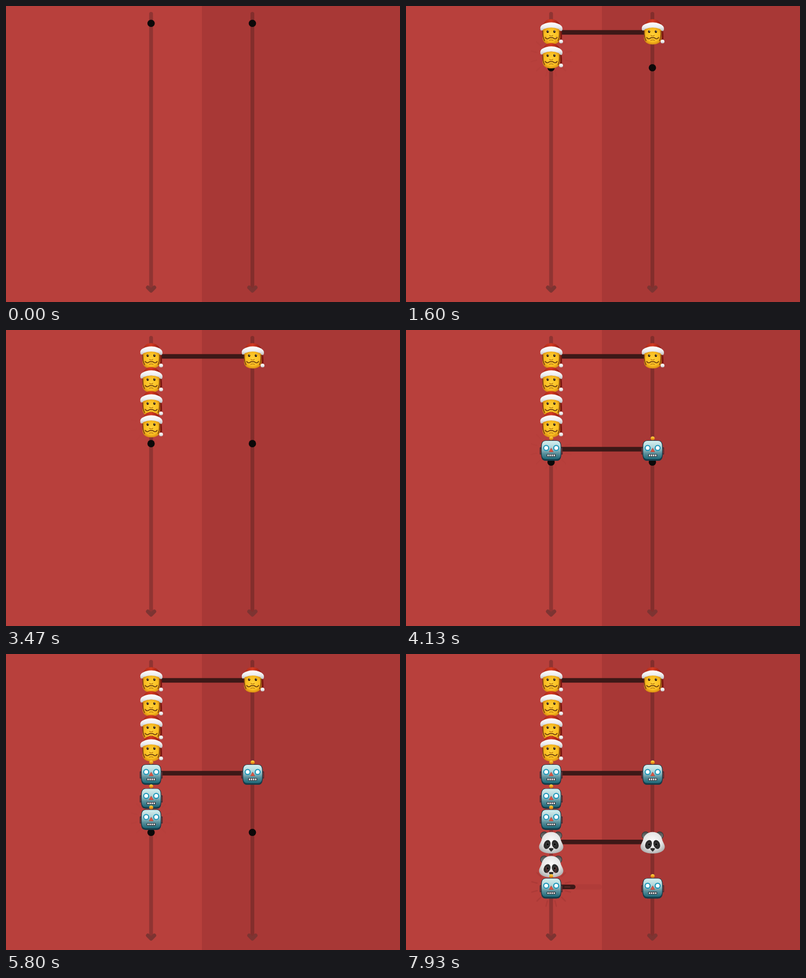
An HTML page that plays this animation: 730 by 550 pixels, repeating every 8 s.

```html
<!DOCTYPE html>
<html lang="en">
<head>
<meta charset="utf-8">
<title>Event timelines</title>
<style>
  html, body { margin: 0; width: 100%; height: 100%; overflow: hidden; background: #b8403c; }
  svg { display: block; width: 100vw; height: 100vh; }
</style>
</head>
<body>
<svg viewBox="0 0 730 550">
  <defs>
    <radialGradient id="skin" cx=".5" cy=".45" r=".62">
      <stop offset="0" stop-color="#ffd23a"/><stop offset=".62" stop-color="#f9bd20"/><stop offset="1" stop-color="#cf7d0d"/>
    </radialGradient>
    <linearGradient id="cap" x2="1">
      <stop offset="0" stop-color="#a92a1a"/><stop offset=".45" stop-color="#d43a22"/><stop offset="1" stop-color="#8a1810"/>
    </linearGradient>
    <linearGradient id="fur" x2="0" y2="1">
      <stop offset="0" stop-color="#fff"/><stop offset=".55" stop-color="#ececee"/><stop offset="1" stop-color="#bdbdc0"/>
    </linearGradient>
    <linearGradient id="metal" x2="0" y2="1">
      <stop offset="0" stop-color="#d3f0f0"/><stop offset=".35" stop-color="#b2d5d9"/><stop offset=".7" stop-color="#578e9a"/><stop offset="1" stop-color="#1d6878"/>
    </linearGradient>
    <linearGradient id="bulb" x2="0" y2="1">
      <stop offset="0" stop-color="#ffd84a"/><stop offset=".5" stop-color="#f3a51d"/><stop offset="1" stop-color="#b95c12"/>
    </linearGradient>
    <radialGradient id="coat" cx=".5" cy=".4" r=".62">
      <stop offset="0" stop-color="#fafafa"/><stop offset=".6" stop-color="#e6e6e6"/><stop offset="1" stop-color="#b0b0b0"/>
    </radialGradient>
    <linearGradient id="ear" x2="0" y2="1">
      <stop offset="0" stop-color="#4d4d4d"/><stop offset="1" stop-color="#848484"/>
    </linearGradient>

    <g id="santa">
      <path d="M13-19Q21-9 20 14L16 13Z" fill="#7c1712"/>
      <path d="M-16-9V9C-16 18-10 22.500 0 22.500S16.500 18 16.500 9V-9Z" fill="url(#skin)"/>
      <path d="M-15.500-3Q-16 9-12 16M15.500-3Q16 9 12.500 16" fill="none" stroke="#7d4312" stroke-width="1.700"/>
      <path d="M-15-12Q-13-24.500 0-24.500Q13-24.500 18-10Z" fill="url(#cap)"/>
      <path d="M-19.500-4Q-21.500-9-18-13Q-9-19 1-18.500Q13-18 19-12Q22.500-8 20-3Q17-1 14-6Q0-12-14-6Q-17-2-19.500-4Z" fill="url(#fur)"/>
      <circle cx="18.300" cy="17" r="3.600" fill="url(#fur)"/>
      <g fill="#26160b"><ellipse cx="-6.500" cy="-1.500" rx="2.100" ry="2.500"/><ellipse cx="6" cy="-1.500" rx="2.100" ry="2.500"/></g>
      <g fill="#fff"><circle cx="-6" cy="-2.500" r=".8"/><circle cx="6.500" cy="-2.500" r=".8"/></g>
      <path d="M-3 5.500Q-1.500 7.500 0 6.500Q1.500 7.500 3 5.500" fill="none" stroke="#c47f0e" stroke-width="1.500" stroke-linecap="round"/>
      <path d="M-11 9.500Q-9 13-5.500 11.500Q-2 9 0 10Q2 9 5.500 11.500Q9 13 11 9.500" fill="none" stroke="#71400f" stroke-width="1.700" stroke-linecap="round"/>
      <path d="M-4 15Q0 13 4 15" fill="none" stroke="#a8650f" stroke-width="1.100"/>
    </g>

    <g id="robot">
      <path d="M-4.500-15Q-4-18.500 0-18.500T4.500-15Z" fill="#594168"/>
      <circle cy="-20" r="3.700" fill="url(#bulb)"/>
      <path d="M-18-2.500H-20.500V9H-18ZM18-2.500H20.500V9H18Z" fill="#a8342e" stroke="#3f2a33" stroke-width="1.300"/>
      <path id="shell" d="M-10-16H10Q17.500-16 18.300-8Q19 3 18.300 13Q17.500 21.500 10 21.500H-10Q-17.500 21.500-18.300 13Q-19 3-18.300-8Q-17.500-16-10-16Z" fill="#173c49"/>
      <use href="#shell"/>
      <path d="M-10-15.500H10Q16.500-15.500 17.300-8Q18 2 17.300 11Q16.500 18.500 10 18.500H-10Q-16.500 18.500-17.300 11Q-18 2-17.300-8Q-16.500-15.500-10-15.500Z" fill="url(#metal)"/>
      <g fill="#fff" stroke="#1795b9" stroke-width="2"><circle cx="-9.300" cy="-2.300" r="4.600"/><circle cx="9.300" cy="-2.300" r="4.600"/></g>
      <path d="M0-2L3.800 5H-3.800Z" fill="#dd5440" stroke="#a83c34" stroke-width=".6"/>
      <rect x="-8.300" y="9" width="16.600" height="5" rx="1" fill="#33383f"/>
      <path d="M-7 11.500H7.200" stroke="#f4f4f4" stroke-width="2.800" stroke-dasharray="2.500 1.300"/>
    </g>

    <g id="panda">
      <g fill="url(#ear)" stroke="#3a3a3a" stroke-width="1.200"><circle cx="-13" cy="-12" r="6.800"/><circle cx="13" cy="-12" r="6.800"/></g>
      <path d="M0-18.500C10-18.500 16.500-12 18-3C20 2 22.500 5 22.500 9.500C22 17.500 12 21.500 0 21.500S-22 17.500-22.500 9.500C-22.500 5-20 2-18-3C-16.500-12-10-18.500 0-18.500Z" fill="url(#coat)"/>
      <g fill="#2b2b2b"><ellipse rx="5.900" ry="8.500" transform="translate(-7.600 4.800) rotate(22)"/><ellipse rx="5.900" ry="8.500" transform="translate(7.600 4.800) rotate(-22)"/></g>
      <g fill="#050505" stroke="#777" stroke-width=".6"><circle cx="-6.500" cy="4.500" r="2.500"/><circle cx="6.500" cy="4.500" r="2.500"/></g>
      <path d="M-4.500 12Q0 10.500 4.500 12Q4 15 0 18Q-4 15-4.500 12Z" fill="#2c2c2c"/>
    </g>

    <g id="track" fill="none" stroke-width="7" stroke-linecap="round" stroke-linejoin="round">
      <path d="M0 14.500V526"/><path d="M-6 523L0 529L6 523" stroke="#7d3432"/>
    </g>
  </defs>

  <rect width="730" height="550" fill="#b8403c"/>
  <rect x="363" width="367" height="550" fill="#a83836"/>
  <use href="#track" x="268.800" stroke="#8f3432"/>
  <use href="#track" x="456.500" stroke="#832e2c"/>
  <g id="dots" fill="#0c0909"><circle cx="268.800" r="6.800"/><circle cx="456.500" r="6.800"/></g>
  <g id="bars" stroke-linecap="round"></g>
  <g id="items"></g>
</svg>
<script>
const LOOP = 8000, STEP = 1000 / 15;
const START_Y = 32.2, SPEED = 0.0516, LAG = 4.5;
const LEFT = 269, RIGHT = 457;
const GROW = 380, FADE = 850;

// kind, y, passed on to the right-hand line
const events = [
  ['santa', 49, true], ['santa', 93.5], ['santa', 138], ['santa', 177],
  ['robot', 221.5, true], ['robot', 266], ['robot', 305.2],
  ['panda', 349.2, true], ['panda', 393.8], ['robot', 432.8, true]
];

const byId = id => document.getElementById(id);
const set = (node, attrs) => {
  for (const key in attrs) node.setAttribute(key, attrs[key]);
  return node;
};
const add = (parent, tag, attrs) =>
  parent.appendChild(set(document.createElementNS('http://www.w3.org/2000/svg', tag), attrs));
const show = (node, on) => set(node, { visibility: on ? 'visible' : 'hidden' });

function rays(from, to) {
  let d = '';
  for (let i = 0; i < 12; i++) {
    const a = (i + 0.5) * Math.PI / 6, c = Math.cos(a), s = Math.sin(a);
    d += `M${c * from} ${s * from}L${c * to} ${s * to}`;
  }
  return d;
}

const items = events.map(([kind, y, passed]) => {
  const group = add(byId('items'), 'g', {});
  const burst = add(group, 'path', {
    transform: `translate(${LEFT} ${y})`, stroke: '#96302e', 'stroke-width': 2.5, 'stroke-linecap': 'round'
  });
  add(group, 'use', { href: '#' + kind, x: LEFT, y });
  const item = { group, burst, time: (y + LAG - START_Y) / SPEED };
  if (passed) {
    add(group, 'use', { href: '#' + kind, x: RIGHT, y });
    const line = (color, width, x1, x2) =>
      add(byId('bars'), 'line', { x1, x2, y1: y, y2: y, stroke: color, 'stroke-width': width });
    item.trail = line('#b03c39', 10, LEFT, 358);
    item.bar = line('#3d1817', 8.5, LEFT, RIGHT);
    item.glint = line('#62302d', 1.5, 294, 304);
  }
  return item;
});

const dots = [...byId('dots').children];

function draw(t) {
  for (const dot of dots) set(dot, { cy: START_Y + SPEED * t });
  for (const { group, burst, time, trail, bar, glint } of items) {
    const age = t - time;
    show(group, age >= 0);
    const fade = Math.max(0, 1 - age / FADE);
    const reach = 35 + 3 * Math.min(1, Math.max(0, age / 120));
    set(burst, { d: rays(reach - 10, reach), opacity: age < 0 ? 0 : 0.45 * fade ** 3 });
    if (!bar) continue;
    const grown = Math.min(1, Math.max(0, age / GROW));
    show(bar, age >= 0);
    show(trail, age >= 0 && grown < 1);
    show(glint, grown > 0.2 && grown < 0.5);
    set(bar, { x2: LEFT + (RIGHT - LEFT) * grown });
  }
}

let begin;
function tick(now) {
  begin ??= now;
  // the motion advances at 15 steps a second
  const t = (now - begin) % LOOP;
  draw(Math.floor((t + 5) / STEP) % 120 * STEP);
  requestAnimationFrame(tick);
}
draw(0);
requestAnimationFrame(tick);
</script>
</body>
</html>
```
